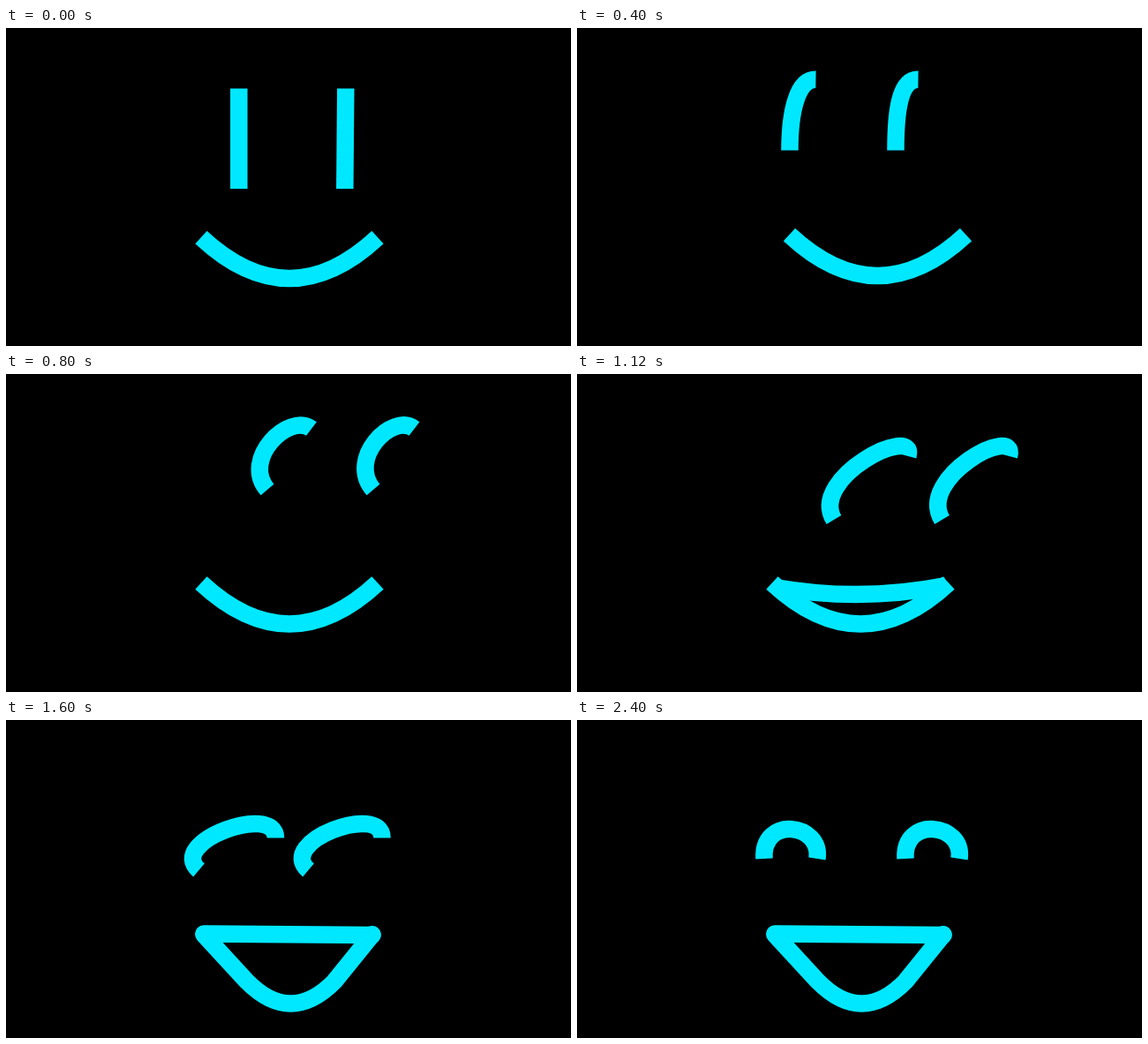
Write an HTML page with a canvas that moves like this. It is 640 px wide and 360 px high and loops after 2480 ms.

```html
<!DOCTYPE html>
<html>
<head>
<meta charset="utf-8">
<style>
  html, body { margin: 0; background: #000; overflow: hidden; }
  canvas { display: block; }
</style>
</head>
<body>
<canvas width="640" height="360"></canvas>
<script>
const ctx = document.querySelector('canvas').getContext('2d');
const LOOP = 2480, STEP = 80;

// The left eye is one cubic from foot to tip; the right eye is the same curve
// moved by a gap at each end. Swing bows the path towards the next pose.
const poses = [
  { at: 0, foot: [263.8, 182], rise: [263.8, 144], fall: [263.8, 106], tip: [263.8, 68.5], gap: [120, 121], swing: [-35, 0] },
  { at: 400, foot: [241, 138.5], rise: [241, 96], fall: [249, 58], tip: [270.5, 58.3], gap: [120, 116], swing: [0, -10] },
  { at: 800, foot: [296, 131], rise: [266, 96], fall: [321, 43], tip: [346, 62], gap: [120, 116.5], swing: [0, 0] },
  { at: 1120, foot: [291, 165], rise: [262, 117], fall: [385, 56], tip: [375, 93], gap: [122.5, 114.5], swing: [34, 0] },
  { at: 1600, foot: [218.5, 170], rise: [181, 138], fall: [306, 93], tip: [305.5, 133.5], gap: [124, 120.5], swing: [0, 0] },
  { at: 1920, foot: [218.5, 170.5], rise: [181, 137], fall: [291, 109.5], tip: [290.7, 152], gap: [124, 120.5], swing: [0, 0] },
  { at: 2400, foot: [212, 157], rise: [209, 108], fall: [278, 117], tip: [272, 157], gap: [160, 161] }
];

const lerp = (a, b, u) => a + (b - a) * u;
const mix = (p, q, u) => p.map((v, i) => lerp(v, q[i], u));
const ramp = (t, from, to) => Math.min(1, Math.max(0, (t - from) / (to - from)));
const bump = u => Math.sin(Math.PI * u);

function drawEyes(t) {
  const k = Math.max(0, poses.findIndex(p => t <= p.at) - 1);
  const a = poses[k], b = poses[k + 1] || a;
  let u = ramp(t, a.at, b.at);
  const [dx, dy] = a.swing.map(v => v * bump(u));
  if (k === 5) u = 1 - (1 - u) ** 1.5;
  const gap = mix(a.gap, b.gap, u);
  for (const side of [0, 1]) {
    const point = (name, end) => {
      const [x, y] = mix(a[name], b[name], u);
      return [x + dx + side * gap[end], y + dy];
    };
    ctx.beginPath();
    ctx.moveTo(...point('foot', 0));
    ctx.bezierCurveTo(...point('rise', 0), ...point('fall', 1), ...point('tip', 1));
    ctx.stroke();
  }
}

// Lower lip: a parabola when closed, straight cheeks and a round chin when open
function drawJaw(open) {
  const to = (shut, wide) => lerp(shut, wide, open);
  const half = to(100, 95.5), corner = to(321, 319.5), cornerY = to(237, 242.8);
  const knee = to(50, 49.5), chin = to(321, 322.5), kneeY = to(271.9, 296);
  const cheekY = (cornerY + kneeY) / 2 + to(5.8, 0);
  const cheek = side => [(corner + chin + side * (half + knee)) / 2, cheekY];
  ctx.beginPath();
  ctx.moveTo(corner - half, cornerY);
  ctx.quadraticCurveTo(...cheek(-1), chin - knee, kneeY);
  ctx.quadraticCurveTo(chin, to(295.1, 346), chin + knee, kneeY);
  ctx.quadraticCurveTo(...cheek(1), corner + half, cornerY);
  ctx.stroke();
}

// Upper lip: leaves the lower one and flattens
function drawLip(part, open) {
  ctx.beginPath();
  ctx.moveTo(lerp(221, 224, part), lerp(237, 242, part));
  ctx.quadraticCurveTo(321, lerp(lerp(330, 259, part), 242.7, open),
    lerp(lerp(421, 418, part), 415, open), lerp(lerp(237, 240, part), 243.5, open));
  ctx.stroke();
}

function drawMouth(t) {
  const out = ramp(t, 0, 400), back = ramp(t, 400, 800);
  const part = ramp(t, 800, 1120), open = ramp(t, 1120, 1600);
  const dx = 19.5 * (out - back) + 22.5 * bump(out) - 30.3 * bump(back ** 1.6);
  ctx.save();
  ctx.translate(dx, -3 * out + 2.5 * back + 0.5 * open);
  ctx.lineCap = open ? 'round' : 'butt';
  drawJaw(open);
  if (part) drawLip(part, open);
  ctx.restore();
}

function frame(now) {
  const t = Math.floor(now % LOOP / STEP) * STEP;
  ctx.clearRect(0, 0, 640, 360);
  ctx.strokeStyle = '#00e8ff';
  ctx.lineWidth = 19.5;
  drawEyes(t);
  drawMouth(t);
}

const start = performance.now();
(function loop() {
  frame(performance.now() - start);
  requestAnimationFrame(loop);
})();
</script>
</body>
</html>
```
